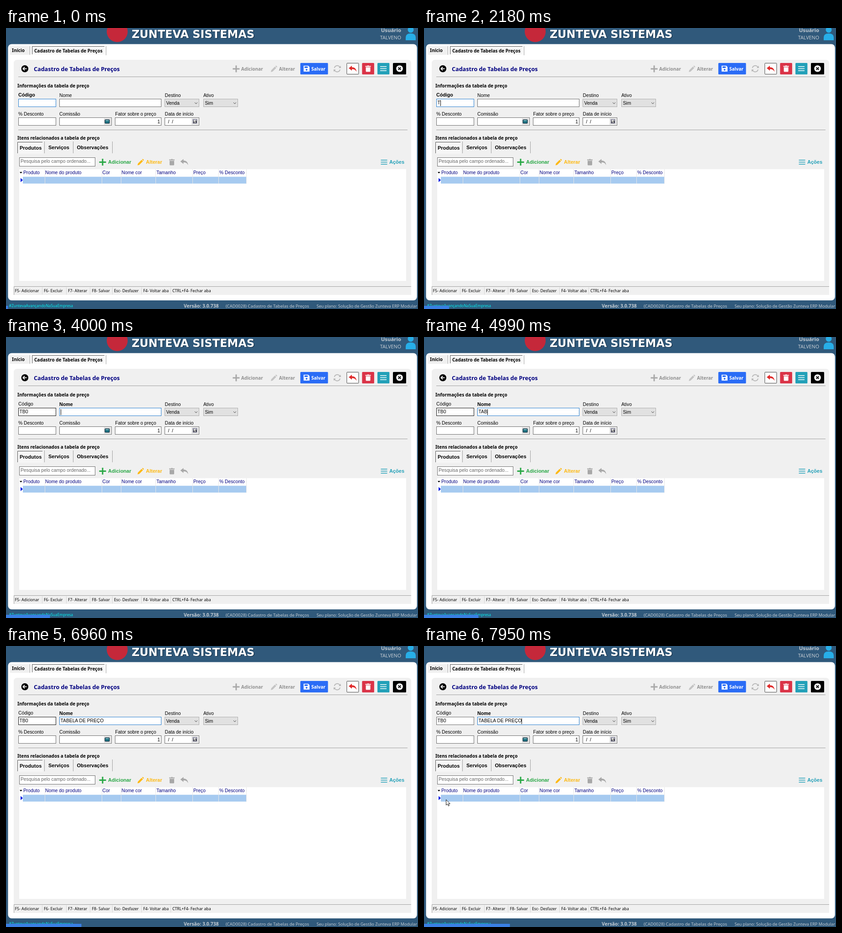
An HTML page for the animation above (8000 ms loop, 904 by 619 pixels).

```html
<!DOCTYPE html>
<html lang="pt-BR">
<head>
<meta charset="utf-8">
<title>Cadastro de Tabelas de Preços</title>
<style>
html, body { margin: 0; width: 100%; height: 100%; overflow: hidden; background: #30597b; }
svg { display: block; }
text { white-space: pre; font: 10.3px "Liberation Sans", Arial, sans-serif; }
.strong { font-weight: bold; font-size: 10.7px; }
.tab { font-weight: bold; font-size: 11px; }
.head { font: bold 10px "Noto Sans", sans-serif; }
.title { font: bold 12.6px "Noto Sans", sans-serif; fill: #000080; }
.status { font: 8.7px "Noto Sans", sans-serif; }
.foot { font: 9.45px "Noto Sans", sans-serif; fill: #c3cbd2; }
.brand { font: bold 24px "DejaVu Sans", sans-serif; fill: #fff; }
.field { fill: #fff; stroke: #6e6e6e; }
.field.hot { stroke: #1a1a1a; }
.field.focus { stroke: #2a80d0; }
.combo { fill: #e1e1e1; stroke: #adadad; }
.line { fill: none; stroke: #a0a0a0; }
.edge { fill: none; stroke: #555; }
.navy text { fill: #000080; }
.off { fill: #a8a8a8; }
</style>
</head>
<body>
<svg width="904" height="619" viewBox="0 0 904 619">
  <defs>
    <path id="plus" d="M6 0H9V6H15V9H9V15H6V9H0V6H6Z"/>
    <path id="pencil" d="M0 14L1 10L9 2L12 5L4 13ZM10 1Q11 0 12 0L14 2Q14 3 13 4Z"/>
    <path id="trash" d="M0 1H4L5 0H7L8 1H12V3H0ZM1 4H11V12.5Q11 14 9.5 14H2.5Q1 14 1 12.5Z"/>
    <path id="undo" d="M7 0L0 5.5L7 11V7.5C12 7.5 15 9 17 13.5C17 7.5 13 3.5 7 3.5Z"/>
    <path id="menu" d="M0 1H14M0 5.5H14M0 10H14" fill="none" stroke-width="1.6"/>
    <path id="chevron" d="M0 0L3 3L6 0" fill="none" stroke="#444"/>
  </defs>
  <rect width="904" height="619" fill="#30597b"/>

  <!-- Banner -->
  <circle cx="244" cy="8" r="23" fill="#c5283a"/>
  <text class="brand" x="412" y="23" text-anchor="middle" style="fill:#17324a">ZUNTEVA SISTEMAS</text>
  <text class="brand" x="410.5" y="21.5" text-anchor="middle">ZUNTEVA SISTEMAS</text>
  <text class="foot" x="867" y="8.5" text-anchor="end" style="font-size:11.4px;font-weight:bold">Usuário</text>
  <text class="foot" x="867" y="25" text-anchor="end" style="font-size:10.7px">TALVENO</text>
  <g fill="#27aee8"><circle cx="888" cy="4" r="6.5"/><path d="M877 27V21Q877 12 888 12Q899 12 899 21V27Z"/></g>

  <!-- Window and tabs -->
  <rect x="4.5" y="35.5" width="897.3" height="564.5" rx="8" fill="#fff"/>
  <rect x="9" y="40" width="43" height="19" fill="#f0f0f0"/>
  <rect x="57" y="40" width="160" height="18" fill="#f6f6f6"/>
  <path class="edge" d="M57.5 58V40.5H216"/>
  <path class="line" d="M52.5 40V59M219.5 40V60"/>
  <text class="head" x="13" y="53">Início</text>
  <text class="head" x="62" y="53.5">Cadastro de Tabelas de Preços</text>
  <path d="M17 588V78Q17 70 25 70H881Q889 70 889 78V588Z" fill="#f0f0f0"/>

  <!-- Toolbar -->
  <circle cx="41.3" cy="89.7" r="7.7"/>
  <path d="M45.5 89.7H38M41 86L37.3 89.7L41 93.4" fill="none" stroke="#fff" stroke-width="1.8"/>
  <text class="title" x="61" y="94.5">Cadastro de Tabelas de Preços</text>
  <use href="#plus" x="497.5" y="82.5" class="off"/>
  <text class="head" x="516" y="93.5" fill="#909090">Adicionar</text>
  <use href="#pencil" x="581" y="83" fill="#c4c4c4"/>
  <text class="head" x="599" y="93.5" fill="#909090">Alterar</text>
  <rect x="645.8" y="77" width="60.7" height="25.3" rx="1.5" fill="#2a6cf6"/>
  <path d="M653 83H663L666 86V96H653Z" fill="#fff"/>
  <path d="M655 84.5H662V88H655Z" fill="#2a6cf6"/><circle cx="659.5" cy="92" r="2" fill="#2a6cf6"/>
  <text class="head" x="670" y="93.5" fill="#fff">Salvar</text>
  <path d="M720.5 88A6.5 6.5 0 0 1 732 85.5M733 91.5A6.5 6.5 0 0 1 721.5 94" fill="none" stroke="#b4b4b4" stroke-width="1.6"/>
  <path d="M730 88H735L734 83ZM723.5 91.5H718.5L719.5 96.5Z" fill="#b4b4b4"/>
  <rect x="747.8" y="77.5" width="26" height="24.3" rx="1" fill="#fff" stroke="#444"/>
  <use href="#undo" x="752" y="83" fill="#e02b2b"/>
  <rect x="781.3" y="77" width="26.5" height="25.3" rx="1.5" fill="#da3347"/>
  <use href="#trash" x="788.5" y="82.5" fill="#fff"/>
  <rect x="815" y="77" width="26.3" height="25.3" rx="1.5" fill="#22a0b8"/>
  <use href="#menu" x="821" y="84" stroke="#fff"/>
  <rect x="849" y="77" width="29" height="25.3" rx="1.5"/>
  <circle cx="863.5" cy="89.5" r="7.3" fill="#fff"/>
  <path d="M860.7 86.7L866.3 92.3M866.3 86.7L860.7 92.3" stroke="#000" stroke-width="2"/>
  <path class="line" d="M27 107.5H881M27 224.5H881"/>

  <!-- Form -->
  <text class="head" x="25" y="131">Informações da tabela de preço</text>
  <text id="codeLabel" x="27" y="151">Código</text>
  <text id="nameLabel" x="117" y="151.5">Nome</text>
  <text x="348.5" y="151.5">Destino</text>
  <text x="433" y="151.5">Ativo</text>
  <rect id="code" class="field" x="27.5" y="156.5" width="82" height="17"/>
  <rect id="name" class="field" x="117.5" y="156.5" width="223" height="17"/>
  <text id="codeText" x="29.5" y="168"></text>
  <text id="nameText" x="119.5" y="168"></text>
  <rect class="combo" x="348.5" y="156.5" width="75" height="17"/>
  <rect class="combo" x="433.5" y="156.5" width="75" height="17"/>
  <text x="351.5" y="169">Venda</text>
  <text x="436.5" y="169">Sim</text>
  <use href="#chevron" x="414" y="164"/>
  <use href="#chevron" x="499" y="164"/>

  <text x="27" y="192.5">% Desconto</text>
  <text x="117" y="192.5">Comissão</text>
  <text x="239.5" y="192.5">Fator sobre o preço</text>
  <text x="348.5" y="192.5">Data de início</text>
  <rect class="field" x="27.5" y="197.5" width="82" height="17"/>
  <rect id="commission" class="field" x="117.5" y="197.5" width="114" height="17"/>
  <rect class="field" x="239.5" y="197.5" width="101" height="17"/>
  <rect class="field" x="348.5" y="197.5" width="75" height="17"/>
  <rect x="215" y="199" width="15" height="14" fill="#e1e1e1"/>
  <rect x="217" y="202" width="10" height="8" rx="1" fill="#1a7080" stroke="#123"/>
  <path d="M218.5 204H225.5" stroke="#d5ffff"/>
  <text x="338" y="209.5" text-anchor="end">1</text>
  <text x="355.5" y="209.5">/  /</text>
  <rect x="407" y="199" width="15" height="14" fill="#e1e1e1"/>
  <rect x="410.5" y="201.5" width="8" height="8" fill="#fff" stroke="#446"/>
  <text x="414.5" y="208.5" text-anchor="middle" style="font-size:7px;font-weight:bold">15</text>

  <!-- Items -->
  <text class="head" x="25" y="246">Itens relacionados a tabela de preço</text>
  <rect x="25" y="251" width="56" height="26" fill="#f6f6f6"/>
  <path class="edge" d="M25.5 276V251.5H80"/>
  <path class="line" d="M84.5 250V276M147.5 250V276M233.5 250V276"/>
  <text class="tab" x="30" y="267.5">Produtos</text>
  <text class="tab" x="93" y="267">Serviços</text>
  <text class="tab" x="155.5" y="267">Observações</text>
  <rect class="field" x="29.5" y="285.5" width="166" height="19"/>
  <text x="32" y="297" fill="#666">Pesquisa pelo campo ordenado...</text>
  <use href="#plus" x="204.5" y="288" fill="#28a745"/>
  <text class="tab" x="224" y="299" fill="#28a745">Adicionar</text>
  <use href="#pencil" x="288.5" y="288.5" fill="#fdb913"/>
  <text class="tab" x="307" y="299" fill="#fdb913">Alterar</text>
  <use href="#trash" x="358" y="288.5" class="off"/>
  <use href="#undo" x="382.5" y="288.5" class="off"/>
  <use href="#menu" x="822.5" y="290" stroke="#22a0b8"/>
  <text class="tab" x="841" y="299" fill="#22a0b8">Ações</text>

  <rect x="29" y="311" width="849" height="246" fill="#fff"/>
  <path d="M30 317H35.5L32.7 320.5Z"/>
  <g class="navy">
    <text x="38" y="321.5">Produto</text>
    <text x="86" y="321.5">Nome do produto</text>
    <text x="211.5" y="321.5">Cor</text>
    <text x="253.5" y="321.5">Nome cor</text>
    <text x="330" y="321.5">Tamanho</text>
    <text x="411" y="321.5">Preço</text>
    <text x="468" y="321.5">% Desconto</text>
  </g>
  <rect x="37" y="327.7" width="491" height="15" fill="#a6caf0"/>
  <path d="M85.5 311V343M210.5 311V343M252.5 311V343M328.5 311V343M409.5 311V343M466.5 311V343M527.5 311V343" stroke="#e6e6e6"/>
  <path d="M32 330.5V339.5L37 335Z" fill="#0018e0"/>

  <!-- Status bar -->
  <path class="line" d="M17.5 588V569.5H889"/>
  <path d="M79.5 571V587M132.5 571V587M184.5 571V587M233.5 571V587M297.5 571V587M361.5 571V587" stroke="#d8d8d8"/>
  <text class="status" x="19.5" y="582">F5- Adicionar</text>
  <text class="status" x="83" y="582">F6- Excluir</text>
  <text class="status" x="136" y="582">F7- Alterar</text>
  <text class="status" x="188.5" y="582">F8- Salvar</text>
  <text class="status" x="237" y="582">Esc- Desfazer</text>
  <text class="status" x="301" y="582">F4- Voltar aba</text>
  <text class="status" x="365" y="582">CTRL+F4- Fechar aba</text>

  <!-- Footer -->
  <text class="foot" x="6.5" y="615" style="font-size:8.4px;fill:#00f0f0">#ZuntevaAvançandoNaSuaEmpresa</text>
  <text class="foot" x="390" y="615.5" style="font-size:10.4px;font-weight:bold">Versão: 3.0.738</text>
  <text class="foot" x="482" y="615.5">(CAD0028) Cadastro de Tabelas de Preços</text>
  <text class="foot" x="902" y="615.5" text-anchor="end" style="font-size:9.14px">Seu plano: Solução de Gestão Zunteva ERP Modular</text>
  <rect id="progress" y="612" height="7" fill="#3a7fe4"/>

  <rect id="caret" y="159" width="1" height="13"/>
  <path id="beam" d="M-3 -6.5H-1L0 -6L1 -6.5H3M0 -6V6M-3 6.5H-1L0 6L1 6.5H3" fill="none" stroke="#000"/>
  <path id="arrow" d="M0 0V12L3 9.5L5 14L7 13L5 9H8.7Z" fill="#fff" stroke="#000" stroke-width=".9"/>
</svg>
<script>
const $ = id => document.getElementById(id);
const STEP = 199, BLINK = 540;
const NAME = "TABELA DE PREÇO";
const FOCUS_NAME = 19;

// Each entry: [step, text]; a new entry restarts the caret blink.
const codeKeys = [[3, ""], [11, "T"], [13, "TB"], [15, "TB0"]];
const nameKeys = [[FOCUS_NAME, ""], [21, "T"], [23, "TA"]];
for (let i = 0; i < 8; i++) nameKeys.push([25 + i, NAME.slice(0, Math.floor(3.2 + 1.7 * i))]);

// Pointer stops: step -> [shape, x, y]
const pointer = {
  1: ["arrow", 170, 330], 2: ["arrow", 150, 255], 3: ["beam", 128, 206],
  38: ["beam", 64, 167], 39: ["arrow", 57, 265], 40: ["arrow", 48, 338]
};
for (let k = 4; k < 11; k++) pointer[k] = ["beam", 66, 165];

const lastKey = (keys, k) => keys.filter(([at]) => at <= k).pop();
const show = (id, on) => $(id).setAttribute("visibility", on ? "visible" : "hidden");

function drawPointer(k) {
  const [shape, x, y] = pointer[k] || [];
  for (const id of ["beam", "arrow"]) {
    show(id, id === shape);
    if (id === shape) $(id).setAttribute("transform", `translate(${x + .5} ${y + .5})`);
  }
}

function drawCaret(k, key, text) {
  show("caret", key && Math.floor((k - key[0]) * STEP / BLINK) % 2 === 0);
  const end = text.textContent ? text.getComputedTextLength() : 0;
  $("caret").setAttribute("x", Math.round(Number(text.getAttribute("x")) + end));
}

function draw() {
  const t = performance.now() % 8000;
  const k = Math.floor((t + 20) / STEP);
  const inName = k >= FOCUS_NAME;
  const codeKey = lastKey(codeKeys, k), nameKey = lastKey(nameKeys, k);

  $("codeText").textContent = codeKey ? codeKey[1] : "";
  $("nameText").textContent = nameKey ? nameKey[1] : "";
  $("codeLabel").classList.toggle("strong", k < 18);
  $("nameLabel").classList.toggle("strong", k >= 18);
  $("code").classList.toggle("focus", !inName);
  $("code").classList.toggle("hot", inName && k < 39);
  $("name").classList.toggle("focus", inName);
  $("commission").classList.toggle("hot", k === 3);
  $("progress").setAttribute("width", 4.5 + 4.6 * k);
  drawCaret(k, inName ? nameKey : codeKey, $(inName ? "nameText" : "codeText"));
  drawPointer(k);
  requestAnimationFrame(draw);
}
draw();
</script>
</body>
</html>
```
